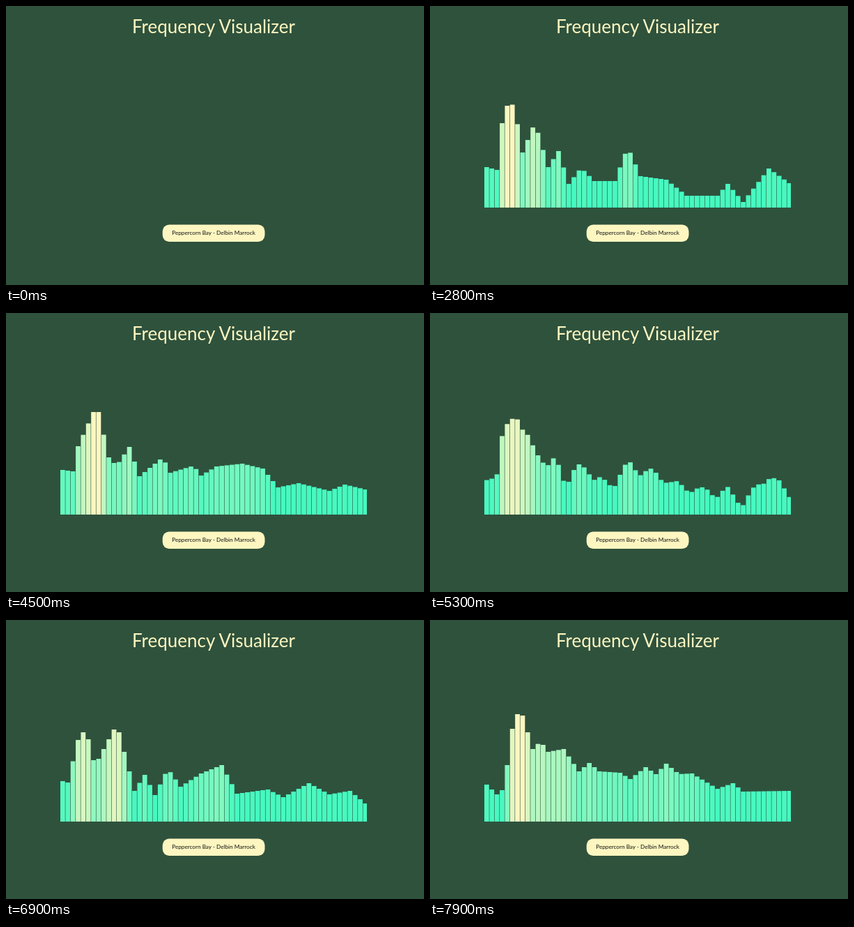
An HTML page that plays this animation: 600 by 400 pixels, repeating every 8 s.

```html
<!DOCTYPE html>
<html lang="en">
<head>
<meta charset="utf-8">
<title>Frequency Visualizer</title>
<style>
  html, body { margin: 0; width: 100%; height: 100%; overflow: hidden; background: #2f523d; }
  svg { display: block; }
  text { font-family: Lato, sans-serif; text-anchor: middle; }
</style>
</head>
<body>
<svg width="600" height="400" viewBox="0 0 600 400">
  <text x="298" y="39" font-size="26" fill="#fdf6c0">Frequency Visualizer</text>
  <g id="bars"></g>
  <rect x="224.7" y="313.5" width="146.8" height="24.5" rx="9.5" fill="#fdf6c0"/>
  <text x="298" y="328" font-size="8.2" fill="#111">Peppercorn Bay - Delbin Marrock</text>
  <g id="cursor" fill="#fff" stroke="#111" stroke-width=".8" stroke-linejoin="round">
    <path id="hand" d="M-1.5 4V-4Q-.7 -5.3 0 -4V-1Q1 -1.7 1.6 -.6Q2.7 -1.2 3.2 0Q4.6 -.3 4.6 1V3L3.6 5H-.3L-3.4 1Q-3.3 -.3 -1.5 1.3Z"/>
    <path id="arrow" d="M-3 -5V4L-1 2.2L.4 5L1.8 4.3L.5 1.6H3.2Z"/>
  </g>
</svg>
<script>
const LOOP = 8000, STEP = 100, BARS = 60, LEFT = 78, RIGHT = 518, PITCH = 7.364, FLOOR = 289;
const $ = id => document.getElementById(id);
const mix = (a, b, u) => a + (b - a) * u;
const clamp = (v, lo, hi) => Math.min(hi, Math.max(lo, v));

// Neighbouring keys around position p and the progress between them
function between(keys, p) {
  const n = keys.findIndex(key => key[0] > p);
  if (n === 0) return [keys[0][1], keys[0][1], 0];
  if (n < 0) { const last = keys[keys.length - 1][1]; return [last, last, 0]; }
  const [p0, a] = keys[n - 1], [p1, b] = keys[n];
  return [a, b, (p - p0) / (p1 - p0)];
}

// A spectrum gives the height of a bar from its peaks and dips, as [bar, height]
const spectrum = (...turns) => i => mix(...between(turns, i));

const silence = () => 0;
const lowNote = spectrum([0, 58], [2, 54], [3, 121], [4, 146], [5.3, 148], [7, 79], [9.4, 122],
  [12, 58], [14, 81], [16, 34], [18.4, 57], [21, 38], [25, 38], [27.5, 87], [30, 45], [35, 40],
  [39, 17], [45, 17], [47, 34], [50, 8], [55, 56], [59, 35]);
// The first note has the same overtones, pitched a little higher
const opening = i => 0.97 * lowNote(i / 1.045);
const highNote = spectrum([0, 64], [2, 62], [3, 98], [6, 147], [7, 147], [9, 82], [10.5, 70],
  [13, 97], [15, 55], [19.5, 82], [21, 60], [25.5, 70], [27, 56], [30, 69], [35, 73], [39, 66],
  [42, 39], [46, 45], [52, 34], [55, 43], [59, 36]);
const twoPeaks = spectrum([0, 58], [1, 56], [3, 117], [4, 128], [5, 118], [6, 88], [7, 90],
  [10, 132], [11, 128], [14, 44], [16, 67], [18, 38], [20.5, 76], [23, 50], [27, 69], [31, 81],
  [34, 40], [40, 46], [43, 35], [48, 55], [52, 39], [56, 44], [59, 26]);
const chord = spectrum([0, 53], [2, 39], [3, 45], [4, 81], [5, 133], [6, 154], [7, 152], [9, 104],
  [10.5, 115], [12, 100], [15, 104], [18, 72], [20, 84], [22, 72], [26, 70], [28, 61], [31, 78],
  [33, 68], [35, 83], [37.5, 68], [40, 69], [45, 47], [48, 55], [50, 43], [59, 44]);

const score = [
  [0, silence], [1000, silence], [1300, opening], [1600, opening], [2800, lowNote],
  [4500, highNote], [6000, lowNote], [6900, twoPeaks], [7900, chord]
];
const pathX = [[500, 262], [1200, 246], [1900, 246], [2500, 251]];
const pathY = [[500, 407], [1000, 338], [1200, 332], [1900, 332], [2500, 407]];

const bars = Array.from({ length: BARS }, (_, i) => {
  const bar = document.createElementNS("http://www.w3.org/2000/svg", "rect");
  const x = LEFT + i * PITCH;
  bar.setAttribute("x", x);
  bar.setAttribute("width", Math.min(PITCH - 0.6, RIGHT - x));
  return $("bars").appendChild(bar);
});

function shade(h) {
  const u = clamp((h - 48) / 99, 0, 1);
  return `rgb(${mix(70, 253, u)}, ${mix(249, 246, u)}, 192)`;
}

function draw(now) {
  const t = Math.floor(now % LOOP / STEP) * STEP, beat = t / STEP;
  const [from, to, u] = between(score, t);
  const sway = from === silence ? 0 : 12 * Math.sin(Math.PI * u);
  bars.forEach((bar, i) => {
    const wave = Math.sin(i * 0.9 + beat * 2.1) * Math.cos(i * 0.37 - beat * 1.3);
    const h = Math.max(0, mix(from(i), to(i), u) + sway * wave);
    bar.setAttribute("y", FLOOR - h);
    bar.setAttribute("height", h);
    bar.setAttribute("fill", shade(h));
  });

  const x = mix(...between(pathX, t)), y = mix(...between(pathY, t));
  const over = y < 340;
  $("cursor").setAttribute("transform", `translate(${x} ${y})`);
  $("hand").style.display = over ? "" : "none";
  $("arrow").style.display = over ? "none" : "";
}

const start = performance.now();
(function frame() {
  draw(performance.now() - start);
  requestAnimationFrame(frame);
})();
</script>
</body>
</html>
```
